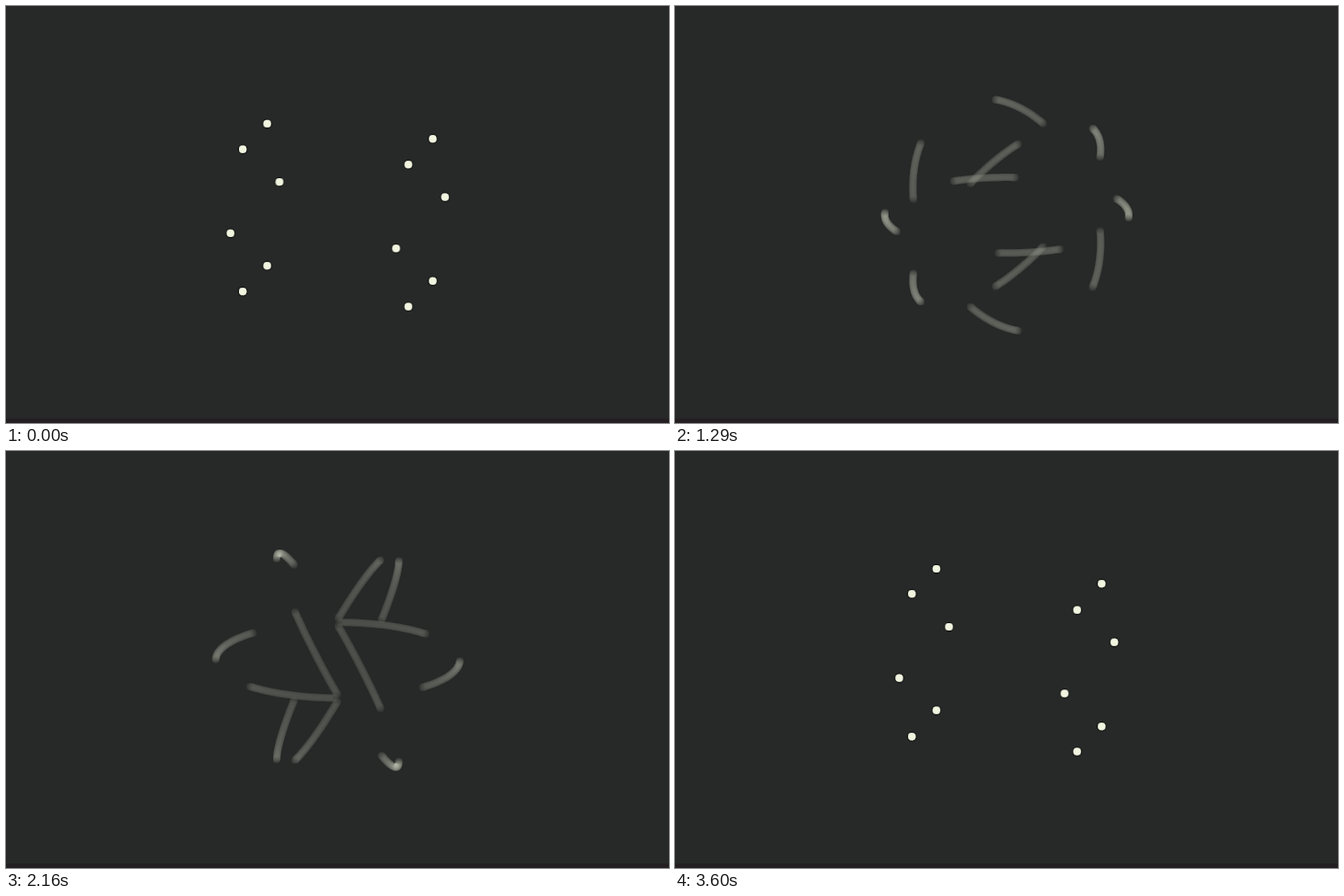
These frames come from a looping animation (720 by 453 pixels, 3630 ms). An HTML page with a canvas:

```html
<!DOCTYPE html>
<html>
<head>
<meta charset="utf-8">
<style>
  html, body { margin: 0; width: 100%; height: 100%; overflow: hidden; background: #272928; }
  canvas { display: block; }
</style>
</head>
<body>
<canvas id="stage" width="720" height="453"></canvas>
<script>
const STEP = 30, LOOP = 3630;          // ms
const SHUTTER = 16, SAMPLES = 51;      // motion blur window in ms, exposures per picture
const RADIUS = 132.6, TILT = 0.31;     // sphere radius, sine of the camera tilt
const SIZE = 300, LEFT = 210, TOP = 77, CX = 150.3, CY = 150.2;
const BACK = [39, 41, 40], DOT = [241, 244, 223];
const rad = Math.PI / 180;

const stage = document.getElementById('stage').getContext('2d');
const buffer = document.createElement('canvas');
buffer.width = buffer.height = SIZE;
const light = buffer.getContext('2d', { willReadFrequently: true });
const response = Array.from({ length: 256 }, (_, v) => (v / 255) ** 0.65);

// Three great circles share a horizontal axis; four dots run round each one.
function eachDot(t, draw) {
  const turn = (-16.5 + 180 * t / 3610) * rad;
  const sinceRest = t < 1863 ? t - 42 : t - 3684;
  const spin = (45 + 4.125e-7 * sinceRest ** 3) * rad;
  for (let circle = -1; circle <= 1; circle++) {
    const lean = circle * 60 * rad;
    for (let k = 0; k < 4; k++) {
      const angle = spin + k * Math.PI / 2;
      const axis = Math.cos(angle);
      const flat = Math.sin(angle) * Math.cos(lean);
      const up = Math.sin(angle) * Math.sin(lean);
      const x = -axis * Math.cos(turn) - flat * Math.sin(turn);
      const z = axis * Math.sin(turn) - flat * Math.cos(turn);
      const y = z * TILT - up * Math.sqrt(1 - TILT * TILT);
      draw(CX + x * RADIUS, CY + y * RADIUS);
    }
  }
}

function disc(x, y, r, color) {
  light.fillStyle = color;
  light.beginPath();
  light.arc(x, y, r, 0, 2 * Math.PI);
  light.fill();
}

// Red collects the dark rim, green the dot itself.
function expose(t) {
  light.globalCompositeOperation = 'source-over';
  light.fillStyle = '#000';
  light.fillRect(0, 0, SIZE, SIZE);
  light.globalCompositeOperation = 'lighter';
  for (let i = 0; i < SAMPLES; i++) {
    const shift = ((i + 0.5) / SAMPLES - 0.5) * SHUTTER;
    eachDot(t + shift, (x, y) => {
      disc(x, y, 5.3, 'rgb(5,0,0)');
      disc(x, y, 4, 'rgb(0,5,0)');
    });
  }
}

function develop() {
  const image = light.getImageData(0, 0, SIZE, SIZE), px = image.data;
  for (let i = 0; i < px.length; i += 4) {
    const core = response[px[i + 1]];
    const rim = 1 - 0.6 * Math.max(0, px[i] - px[i + 1]) / 255;
    for (let c = 0; c < 3; c++) {
      px[i + c] = BACK[c] * rim * (1 - core) + DOT[c] * core;
    }
  }
  stage.putImageData(image, LEFT, TOP);
}

stage.fillStyle = `rgb(${BACK})`;
stage.fillRect(0, 0, 720, 453);
stage.fillStyle = '#241f22';
stage.fillRect(0, 448, 720, 5);

const start = performance.now();
let shown = -1;
function frame() {
  const t = Math.floor((performance.now() - start) % LOOP / STEP) * STEP;
  if (t !== shown) {
    shown = t;
    expose(t);
    develop();
  }
  requestAnimationFrame(frame);
}
frame();
</script>
</body>
</html>
```
